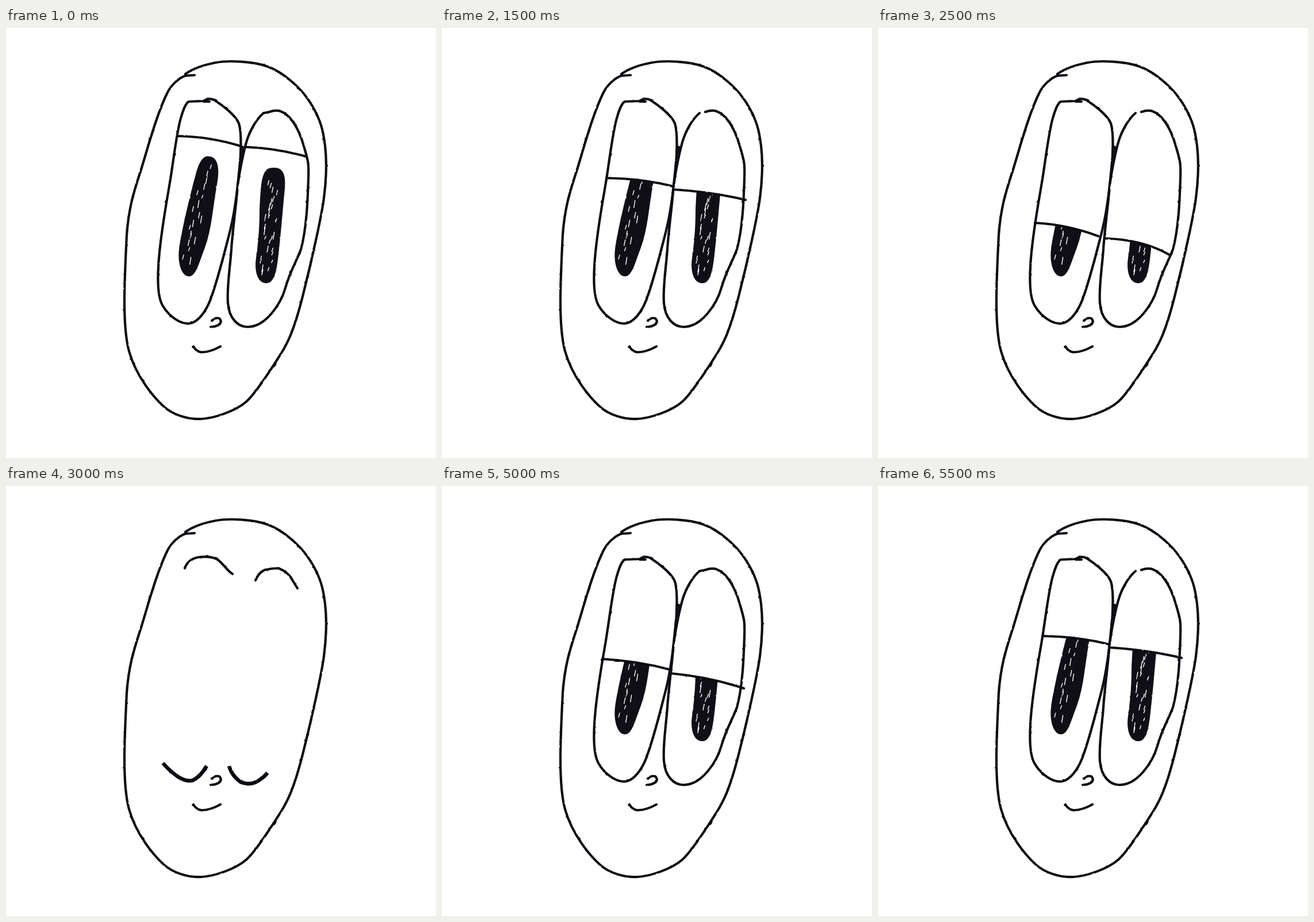
These frames come from a looping animation (748x748 px, 6 s). An HTML page:

```html
<!DOCTYPE html>
<html lang="en">
<head>
<meta charset="utf-8">
<title>Sleepy face</title>
<style>
  html, body { margin: 0; width: 100%; height: 100%; overflow: hidden; background: #fff; }
  svg { display: block; width: 100vw; height: 100vh; }
  .ink { fill: none; stroke: #0d0b11; stroke-width: 4.2; stroke-linecap: round; stroke-linejoin: round; }
  .lash { stroke-width: 6.5; stroke-linecap: butt; }
  .solid { fill: #110f16; }
  .cover { fill: #fff; }
  .scratch { fill: none; stroke: #fff; stroke-width: 1.4; stroke-linecap: round; }
</style>
</head>
<body>
<svg viewBox="0 0 748 748">
  <defs>
    <filter id="rough" filterUnits="userSpaceOnUse" x="0" y="0" width="748" height="748" color-interpolation-filters="sRGB">
      <feTurbulence type="fractalNoise" baseFrequency="0.11" numOctaves="2" seed="4"/>
      <feDisplacementMap in="SourceGraphic" scale="2" xChannelSelector="R" yChannelSelector="G"/>
    </filter>
  </defs>
  <g filter="url(#rough)">
    <g id="awake">
      <!-- pupils -->
      <path class="solid" d="M351,223C372,223 371,250 367,272C360,310 358,350 346,382S330,432 318,432S298,410 301,385S320,290 330,255C334,240 340,223 351,223Z"/>
      <path class="solid" d="M467,243C489,243 486,270 484,290S478,360 475,385S470,444 453,444S432,420 435,400S441,350 441,320C442,295 443,270 447,258S455,243 467,243Z"/>
      <path id="scratches" class="scratch"/>
      <!-- lids hide the upper part of the pupils -->
      <path id="leftCover" class="cover"/>
      <path id="rightCover" class="cover"/>
      <!-- eye outlines -->
      <path class="ink" d="M318,128L344,127Q352,121 362,125C376,134 400,152 405,166S409,220 406,245S401,310 389,356S368,440 355,474C348,492 334,513 318,514S282,500 272,482S264,420 267,390S277,315 284,275S296,185 304,157C307,147 311,132 318,128Z"/>
      <path class="ink" d="M458,146Q470,142 478,145C494,151 508,172 517,202S527,235 526,262S524,345 513,385C507,402 494,424 486,452S452,520 420,520C404,520 388,506 386,478S390,415 392,385S400,310 402,285S412,220 418,199S436,158 448,148"/>
      <path class="ink" d="M344,128L354,128"/>
      <path class="solid" d="M408,203L416,207L412,226L405,248ZM400,303L399,320L394,345L388,362L390,345Z"/>
      <path id="browGap" class="ink" d="M448,148L458,146"/>
      <path id="lidEdges" class="ink"/>
    </g>
    <g id="asleep">
      <path class="ink" d="M311,143Q316,128 334,124Q356,121 368,128C378,135 384,147 394,153"/>
      <path class="ink" d="M434,164Q440,150 450,146Q462,143 474,143Q492,150 499,165L507,178"/>
      <path class="ink lash" d="M273,482Q283,494 298,505Q313,515 325,512Q338,506 349,487M388,487Q392,503 408,515Q425,522 440,512Q448,507 455,499"/>
    </g>
    <!-- head, nose, mouth -->
    <path class="ink" d="M312,80C326,70 344,64 366,60S430,58 455,67S512,102 530,131S552,180 555,205S557,265 553,296S531,408 516,467S490,548 478,567S436,634 418,650S362,679 340,680S292,674 275,659S226,606 214,562S206,440 210,360C214,305 226,275 236,243S262,150 281,112C286,102 298,88 312,83L328,82"/>
    <path class="ink" d="M358,509Q364,503 371,505Q376,510 372,515Q365,520 356,520"/>
    <path class="ink" d="M326,554Q331,563 340,564Q355,564 373,554"/>
  </g>
</svg>
<script>
const byId = id => document.getElementById(id);
const setPath = (id, d) => byId(id).setAttribute('d', d);

let seed = 7;
const random = () => (seed = seed * 16807 % 2147483647) / 2147483647;

// Unfilled slivers of the scribble, scattered along a pupil's axis
function scratch([x1, y1], [x2, y2], count) {
  let d = '';
  for (let i = 0; i < count; i++) {
    const along = (i + random()) / count;
    const x = x1 + (x2 - x1) * along + (random() - 0.5) * 22;
    const y = y1 + (y2 - y1) * along;
    d += `M${x},${y}l-2,${4 + random() * 9}`;
  }
  return d;
}
setPath('scratches', scratch([348, 238], [317, 405], 18) + scratch([465, 262], [453, 425], 26));

// Left and right lid edge, from wide open to nearly shut
const lidPoses = [
  ['M299,188Q354,189 407,205', 'M417,207Q470,209 520,223'],
  ['M286,261Q350,262 404,276', 'M404,281Q470,285 528,299'],
  ['M280,301Q340,304 399,320', 'M399,326Q465,332 525,352'],
  ['M273,339Q330,342 383,362', 'M395,366Q460,368 506,394']
];
const SHUT = lidPoses.length;
const poseByHalfSecond = [0, 0, 0, 1, 2, 3, SHUT, SHUT, SHUT, 3, 2, 1];
let shown = -1;

function show(pose) {
  if (pose === shown) return;
  shown = pose;
  const shut = pose === SHUT;
  byId('awake').style.display = shut ? 'none' : '';
  byId('asleep').style.display = shut ? '' : 'none';
  if (shut) return;
  const [left, right] = lidPoses[pose];
  setPath('leftCover', left + 'V150H300Z');
  setPath('rightCover', right + 'V150H410Z');
  setPath('lidEdges', left + right);
  byId('browGap').style.display = pose % 2 ? 'none' : '';
}

function tick() {
  show(poseByHalfSecond[Math.floor(performance.now() % 6000 / 500)]);
  requestAnimationFrame(tick);
}
tick();
</script>
</body>
</html>
```
